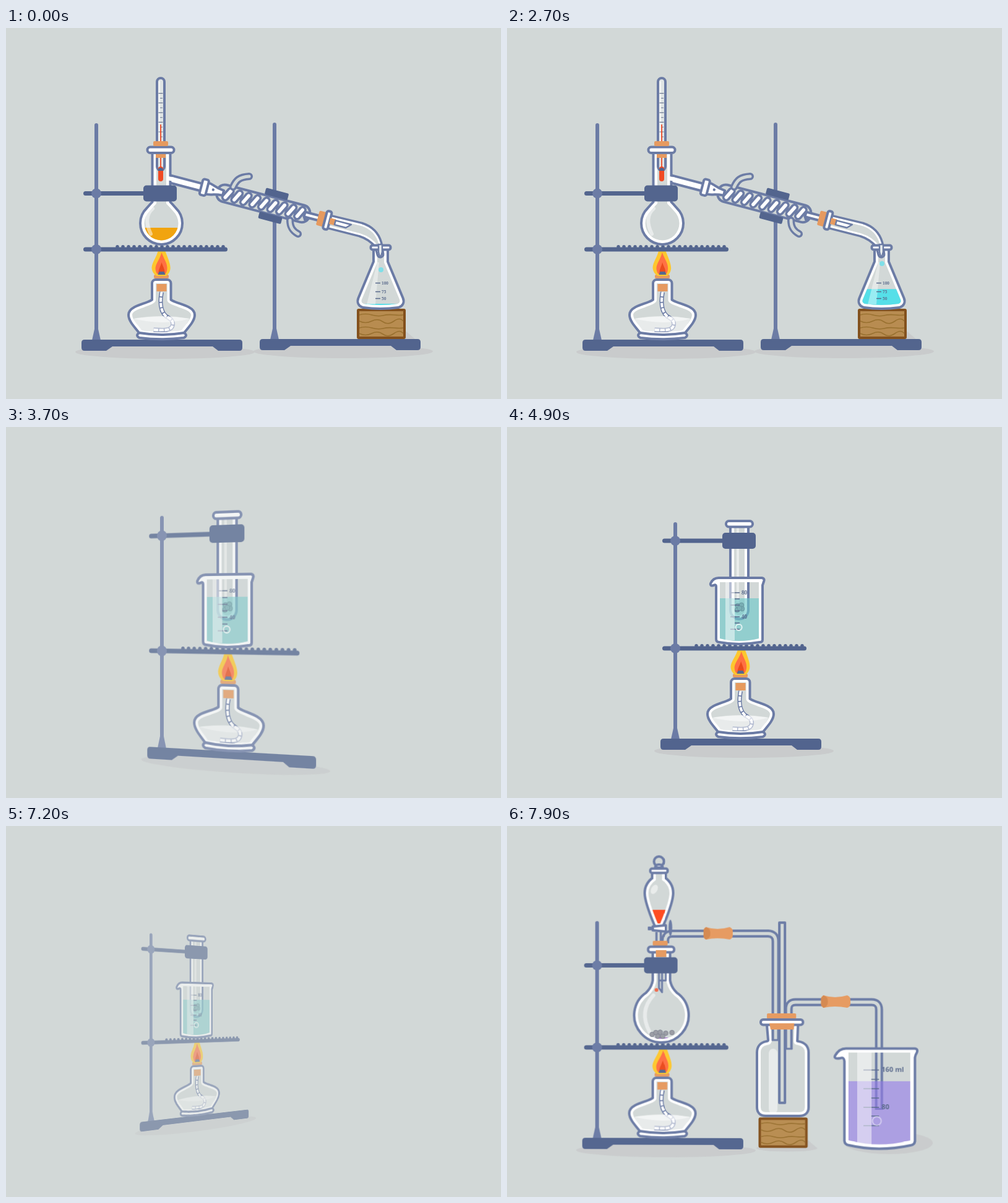
Recreate the animation shown at these times as an HTML page. Size 800 px wide and 600 px high, loop 8000 ms.

```html
<!DOCTYPE html>
<html lang="en">
<head>
<meta charset="utf-8">
<title>Laboratory setups</title>
<style>
html, body { margin: 0; width: 100%; height: 100%; overflow: hidden; background: #d2d8d7; }
#stage { position: relative; width: 800px; height: 600px; overflow: hidden; perspective: 1130px; }
svg { position: absolute; inset: 0; transform-origin: 0 50%; }
path, rect, circle, ellipse { stroke-linejoin: round; }
.o { fill: #fff; stroke: #6b7ba5; stroke-width: 4; }
.b { fill: #6b7ba5; }
.d { fill: #52648e; }
.k { fill: #e69a5f; }
.s { fill: #c9cbcc; }
.n { fill: none; }
.w { fill: #fff; fill-opacity: .5; }
.shine { fill: none; stroke: #fff; stroke-opacity: .5; stroke-width: 6; stroke-linecap: round; }
.tick { fill: none; stroke: #5a6a8c; stroke-width: 1.5; }
.bead { fill: #9a9ca4; stroke: #7f8391; }
.sunk { opacity: .6; }
.sunk .bead { fill: #6a9aa3; stroke: #4a7482; }
.bubble { fill: none; stroke: #fff; stroke-width: 2; }
text { fill: #5a6a8c; font-weight: 600; }
.serif { font-family: "Noto Serif", serif; }
.sans { font-family: "Noto Sans", sans-serif; font-weight: 700; fill: #7680a2; }
</style>
</head>
<body>
<div id="stage"></div>
<script>
const BG = '#d2d8d7', BLUE = '#6b7ba5';

const path = (d, attrs) => `<path d="${d}" ${attrs}/>`;
const rect = (x, y, w, h, r, attrs) =>
  `<rect x="${x}" y="${y}" width="${w}" height="${h}" rx="${r}" ${attrs}/>`;
const dot = (x, y, r, attrs) => `<circle cx="${x}" cy="${y}" r="${r}" ${attrs}/>`;
const oval = (x, y, rx, ry, attrs) => `<ellipse cx="${x}" cy="${y}" rx="${rx}" ry="${ry}" ${attrs}/>`;
const group = (transform, body) => `<g transform="${transform}">${body}</g>`;
const line = (d, color, w, cap = 'butt') =>
  path(d, `class="n" stroke="${color}" stroke-width="${w}" stroke-linecap="${cap}"`);

// Walls lie outside the given inner contour: white, then blue.
const glass = (d, wall = 4, edge = 4) =>
  line(d, BLUE, 2 * (wall + edge)) + line(d, '#fff', 2 * wall) + path(d, `fill="${BG}"`);
const vessel = (outer, inner) => path(outer, 'class="o"') + path(inner, `fill="${BG}"`);
const pipe = (d, outer = 13, inner = 5, cap) => line(d, BLUE, outer, cap) + line(d, BG, inner, cap);

// A liquid inside a contour, filled from level y downwards.
const liquid = (id, d, y, color, alpha = 1) =>
  `<clipPath id="${id}Clip">${path(d, '')}</clipPath><g clip-path="url(#${id}Clip)">` +
  `<rect id="${id}" y="${y}" width="800" height="300" fill="${color}" fill-opacity="${alpha}"/></g>`;

const beads = points => points.map(([x, y]) => dot(x, y, 3.8, 'class="bead"')).join('');

const stand = oval(257, 524, 145, 11, 'class="s"') +
  rect(143, 154, 6, 345, 3, 'class="b"') +
  path('M143 487H149L153 505H139Z', 'class="b"') +
  path('M127 504H377Q382 504 382 509V517Q382 522 377 522H343L334 515H172L162 522H127Q122 522 122 517V509Q122 504 127 504Z', 'class="d"');

const wick = 'M252 427C249 443 250 458 259 466C265 470 271 472 270 480C268 490 256 489 239 488';
const lamp = glass('M242.5 413H261V440C261 450 299.5 453 299.5 464C299.5 472 289 482 284 489Q252 493 220 489C215 482 204.5 472 204.5 464C204.5 453 242.5 450 242.5 440Z') +
  rect(244, 414, 16, 12, 0, 'class="k"') +
  line(wick, BLUE, 7) +
  path(wick, 'class="n" stroke="#fff" stroke-width="4" stroke-dasharray="7 1.8"') +
  path('M207 470Q252 463 297 470C295 476 288 484 284 489Q252 493 220 489C214 482 208 476 207 470Z', 'class="w"') +
  path('M207 470Q252 462 297 470Q275 476 252 476Q225 475 207 470Z', 'class="w"') +
  path('M216 493Q252 499 288 493Q295 497 288 501Q252 505.5 216 501Q209 497 216 493Z', 'class="o"') +
  rect(239.5, 399, 24, 6, 2, 'class="k"') +
  '<g class="flame">' +
  path('M246 361H258C262 372 267 382 266 390C265 396 262 399 259 401H244C239 398 236 393 236 387C237 378 243 372 246 361Z', 'fill="#fdc72e"') +
  path('M252 363C256 374 261 380 261 388C261 394 259 398 256 399H248C244 398 242 394 242 388C243 380 249 374 252 363Z', 'fill="#ff7043"') +
  path('M252 379C254 386 257 389 257 395L256 399H247C246 391 250 387 252 379Z', 'fill="#ea4a1c"') +
  '</g>' + path('M246 399L248 394H256L258 399Z', 'fill="#56688f"');

const gauze = rect(125, 354.5, 233, 7, 3.5, 'class="d"') +
  path('M180 353.8H352', 'class="n" stroke="#52648e" stroke-width="5.5" stroke-linecap="round" stroke-dasharray="0 9"') +
  dot(146, 358, 8, 'class="b"');

const burner = stand + group('translate(-.5 0)', lamp) + gauze;
const clamp = y => rect(125, y - 3.5, 110, 7, 3.5, 'class="d"') +
  dot(146, y, 8, 'class="b"') + rect(222, y - 13, 54, 26, 5, 'class="d"');

const block = path('M640 485L661 503H620Z', 'class="s"') +
  rect(569, 456, 75, 45, 1, 'fill="#b88c50" stroke="#83501c" stroke-width="4"') +
  [464, 474, 485, 494].map((y, i) =>
    line(`M571 ${y}q10 ${i % 2 ? 5 : -3} 20 0t18 1t18 -1t15 0`, '#99702f', 1.6)).join('');

function distillation() {
  const bulb = 'M243 200V284Q238 289 232 296A27.5 27.5 0 1 0 270 296Q264 289 259 284V200Z';
  const cone = 'M600 358V379L575 439Q573 444 578 446Q605 450 633 446Q638 444 636 439L611 379V358Z';
  const tilted = body => group('translate(264 244) rotate(14.7)', body);
  let coils = '';
  for (let u = 98; u < 220; u += 15) {
    coils += line(`M${u + 5} -8Q${u + 6} 0 ${u + 11} 8`, BLUE, 5, 'round') +
      line(`M${u - 3} 6L${u + 3} -6`, BLUE, 13, 'round') + line(`M${u - 3} 6L${u + 3} -6`, '#fff', 5.5, 'round');
  }
  const arm = tilted(
    rect(-4, -6, 62, 12, 0, 'class="o"') +
    rect(80, -14, 154, 28, 12, `fill="${BG}" stroke="${BLUE}" stroke-width="4"`) +
    path('M62 -10C72 -10 74 -5 90 -4V4C74 5 72 9 62 9Z', 'class="o"') +
    rect(53, -14, 10, 26, 3, 'class="o"') + dot(73, -1, 2.2, 'class="b"') +
    coils + rect(226, -4, 26, 8, 0, 'class="o"'));
  const joint = tilted(
    rect(248, -12, 12, 24, 2, 'class="k"') +
    rect(260, -15, 8, 30, 3, 'class="o"') +
    rect(268, -5, 9, 10, 0, 'class="k"') +
    path('M277 -3H303L296 4H277Z', 'fill="#fff" stroke="#6b7ba5" stroke-width="2.5"'));
  const grip = (x, y) => group(`translate(${x} ${y}) rotate(14.7)`, rect(-19, -5.5, 38, 11, 2, 'class="d"'));

  return group('translate(288 -1)', stand) + burner +
    arm + pipe('M367 257C372 246 377 241 393 240', 12, 5, 'round') +
    pipe('M459 311C459 322 463 328 472 333', 12, 5, 'round') +
    grip(437.5, 268.5) + grip(427, 307) +
    glass(bulb, 4.5) + liquid('amber', bulb, 323, '#f1a40f') +
    path('M237 292Q221 306 234 333', 'class="shine"') +
    path('M259 239L272 242V248L259 246Z', 'fill="#fff"') +
    rect(244, 81, 12, 149, 6, `fill="#e0e5e5" stroke="${BLUE}" stroke-width="4"`) +
    rect(246, 86, 3, 98, 1, 'class="w"') +
    path('M250 105V183', 'class="n" stroke="#69758f" stroke-width="7" stroke-dasharray="1.2 14.4"') +
    path('M251 113V183', 'class="n" stroke="#69758f" stroke-width="4" stroke-dasharray="1 14.6"') +
    line('M250 156V230', '#f04a24', 1.8) +
    rect(246, 224, 8, 24, 4, 'fill="#f04a24"') + path('M245.5 231A4.5 5 0 0 1 254.5 231Z', 'class="d"') +
    rect(242, 200, 16, 10, 0, 'class="k"') + rect(228.5, 192.5, 43, 9.5, 4.5, 'class="o"') +
    rect(238, 183, 24, 8, 2, 'class="k"') + clamp(267.5) +
    block + glass(cone) +
    liquid('aqua', cone, 446, '#55dfe8') +
    path('M600 379L583 447H597L603 379Z', 'class="w" opacity=".8"') +
    dot(606, 391, 4, 'id="drip" fill="#7fdfe8"') +
    path('M597 412.5H605M597 426.5H605M597 437.5H605', 'class="tick"') +
    '<g class="serif" font-size="6.5"><text x="607" y="415">100</text><text x="607" y="429">75</text><text x="607" y="440">50</text></g>' +
    glass('M524 308L574 320Q596 327 602 348L605 366L601 352Q591 338 572 332L521 319Z', 3, 3.5) +
    rect(589.5, 351.5, 32, 7, 3, 'class="o"') +
    path('M602 350V362Q605 376 608 362V350Z', `fill="#e9eded" stroke="${BLUE}" stroke-width="2.5"`) + joint;
}

function waterBath() {
  const shell = 'M338 258Q338 254 334 256Q328 258 329 253Q333 244 342 244H412Q417 245 415 250Q414 253 413 256V344Q413 348 408 348Q375 354 343 348Q338 348 338 343Z';
  const beaker = 'M344 251V342Q375 350 407 342V251Z';
  const tube = 'M367 158V296A8.5 8.5 0 0 0 384 296V158Z';
  return group('translate(126 0)', burner) + vessel(shell, beaker) +
    glass(tube) + rect(371, 160, 4, 140, 2, 'class="w"') +
    rect(354, 152, 43, 9.5, 4.5, 'class="o"') + group('translate(126 0)', clamp(184)) +
    liquid('teal', beaker, 277, '#6bc9ca', .62) +
    '<g class="sunk">' + beads([[373, 289], [379, 288], [372, 296], [380, 294], [376, 293]]) + '</g>' +
    rect(342, 246, 70, 5, 0, 'fill="#fff"') + line('M342 244H412', BLUE, 4) +
    path('M361 268H376M368 278H376M361 288H376M368 297.5H376M361 307H376M368 317H376M361 327H376', 'class="tick"') +
    rect(353, 251, 15, 94, 0, 'class="w"') +
    '<g class="serif" font-size="8"><text x="379" y="271">80</text><text x="379" y="310">40</text></g>' +
    dot(0, 0, 5, 'class="bubble" opacity=".75" id="bathBubble"');
}

function gasWashing() {
  const bulb = 'M242 204V250Q240 264 229 274.3A38 38 0 1 0 271 274.3Q260 264 258 250V204Z';
  const funnel = 'M241 78V88Q229 96 229 109Q229 122 244 158H248Q263 122 263 109Q263 96 251 88V78Z';
  const shell = 'M544.5 380Q544 373 538 375Q527 377 529.5 371Q536 359.5 547 359.5H657Q663 360 660.5 366Q658 370 657.5 374V508Q657 514 650 515Q600 526 552 515Q545 514 544.5 508Z';
  const beaker = 'M551 366V507Q600 520 650 507V366Z';
  const sleeve = path('M322 164Q340 170 360 164Q366 166 365 174Q366 182 360 184Q340 180 322 184Q317 182 318 174Q317 166 322 164Z', 'class="k"') +
    path('M322 164Q329 166 329 174Q329 182 322 184Q317 182 318 174Q317 166 322 164Z', 'fill="#d5884f"');
  return burner + oval(452, 520, 49, 5.5, 'class="s"') + oval(615, 511, 71, 18, 'class="s"') +
    group('translate(-160.5 16.5)', block) +
    glass(bulb) + liquid('violet', bulb, 342, '#a86bd1') +
    path('M237 274Q213 300 231 333', 'class="shine"') +
    beads([[235, 337], [241, 334], [248, 333.5], [257, 335], [267, 334], [244, 340], [252, 340]]) +
    line('M246 238V262L251 269V238M247 250H257V238', BLUE, 3) +
    dot(242, 265, 3, 'id="redDrop" fill="#ee6a4c"') +
    line('M242 172V190M249 172V190', BLUE, 3.5) +
    glass('M426 322L428 346Q428 353 420 354Q410 356 410 366V454Q410 462 418 462H472Q481 462 481 454V366Q481 356 470 354Q462 353 463 346L464 322Z') +
    rect(423, 360, 14, 104, 7, 'class="w"') +
    pipe('M256 190V186Q256 175 267 174.5H422Q434 175 434 187V347') + line('M428 346H440', BLUE, 3) +
    pipe('M455 361V296Q455 285 466 285H588Q600 285 600 297V365') + line('M449 360H461', BLUE, 3) +
    rect(440, 157, 9, 290, 0, `fill="${BG}" stroke="${BLUE}" stroke-width="4"`) +
    rect(420, 303, 47, 9, 2, 'class="k"') + rect(410, 313, 68, 8.5, 4, 'class="o"') +
    path('M424 319H464L463 329H426Z', 'class="k"') +
    sleeve + group('translate(189 110)', sleeve) +
    rect(236, 186, 24, 8, 2, 'class="k"') + rect(228.5, 195.5, 42, 9, 4, 'class="o"') +
    rect(241, 201, 17, 11, 0, 'class="k"') + clamp(225.5) +
    dot(246, 58, 8, `class="n" stroke="${BLUE}" stroke-width="4"`) +
    path('M240 68Q240 63 246 63Q252 63 252 68Z', 'class="o"') +
    glass(funnel) + liquid('red', funnel, 136, '#ff4a1f') +
    oval(238.5, 103, 5, 8, 'class="w" transform="rotate(30 238.5 103)"') +
    rect(232, 69.5, 28, 7, 3, 'class="o"') +
    oval(264.5, 165, 3, 13, 'class="b"') + rect(228, 163, 6, 6, 1, 'class="b"') +
    path('M236 163L257 161V171L236 169Z', 'class="o"') +
    vessel(shell, beaker) + pipe('M600 366V458') + line('M594 456.5H606', BLUE, 3) +
    liquid('purple', beaker, 412, '#9179e9', .6) +
    path('M575 394H600M587 409H600M575 424H600M587 439H600M575 454H600M587 468H600M575 483.5H600', 'class="tick"') +
    rect(565, 366, 23, 148, 0, 'class="w"') +
    '<g class="sans" font-size="11"><text x="604" y="397.5">160 ml</text><text x="604" y="457.5">80</text></g>' +
    dot(0, 0, 7, 'class="bubble" opacity=".45" id="washBubble"');
}

const stage = document.getElementById('stage');
stage.innerHTML = [distillation, waterBath, gasWashing]
  .map(draw => `<svg width="800" height="600" viewBox="0 0 800 600">${draw()}</svg>`).join('');
const scenes = [...stage.children];
const flames = [...stage.querySelectorAll('.flame')];
const set = (id, attrs) => {
  const el = document.getElementById(id);
  for (const name in attrs) el.setAttribute(name, attrs[name]);
};

// Each scene swings away around the left edge, the next one swings in.
function turn(t) {
  const current = t < 3450 ? 0 : t < 7350 ? 1 : 2;
  const d = t > 5500 ? t - 3900 : t;
  const leaving = d < 3450;
  const angle = leaving
    ? (Math.max(0, d - 2680) * .0055) ** 3
    : -((Math.max(0, 4166 - d) * .0054) ** 3);
  scenes.forEach((svg, i) => {
    svg.style.display = i === current ? '' : 'none';
    svg.style.opacity = leaving ? 1 - angle / 90 : 1 + angle / 60;
    svg.style.transform = angle ? `rotateY(${angle}deg)` : 'none';
  });
}

function draw(now) {
  const t = now % 8000;
  turn(t);

  const sway = Math.sin(t * Math.PI / 250);
  flames.forEach(f => f.setAttribute('transform',
    `translate(252 401) skewX(${2 * sway}) scale(${1 - .03 * sway} 1) translate(-252 -401)`));

  const run = Math.min(t, 2850);
  set('amber', { y: 323 + .0078 * run });
  set('aqua', { y: 446 - .0088 * run });
  set('drip', { cy: 391 + ((t + 200) % 700 - 200) * .1, opacity: t < 2850 ? 1 : 0 });

  const rise = 341 - .045 * ((t + 190) % 1178);
  set('bathBubble', { cx: 376 - ((337 - rise) / 49) ** 2 * 19, cy: rise });

  const late = t - 7500;
  set('washBubble', { cx: 596.5, cy: 494 - .045 * late });
  set('red', { y: 133 + .0075 * late });
  set('violet', { y: 345 - .0075 * late });
  set('redDrop', { cy: 262 + ((late + 330) % 660) * .045 });
}

const start = performance.now();
(function frame() {
  draw(performance.now() - start);
  requestAnimationFrame(frame);
})();
</script>
</body>
</html>
```
